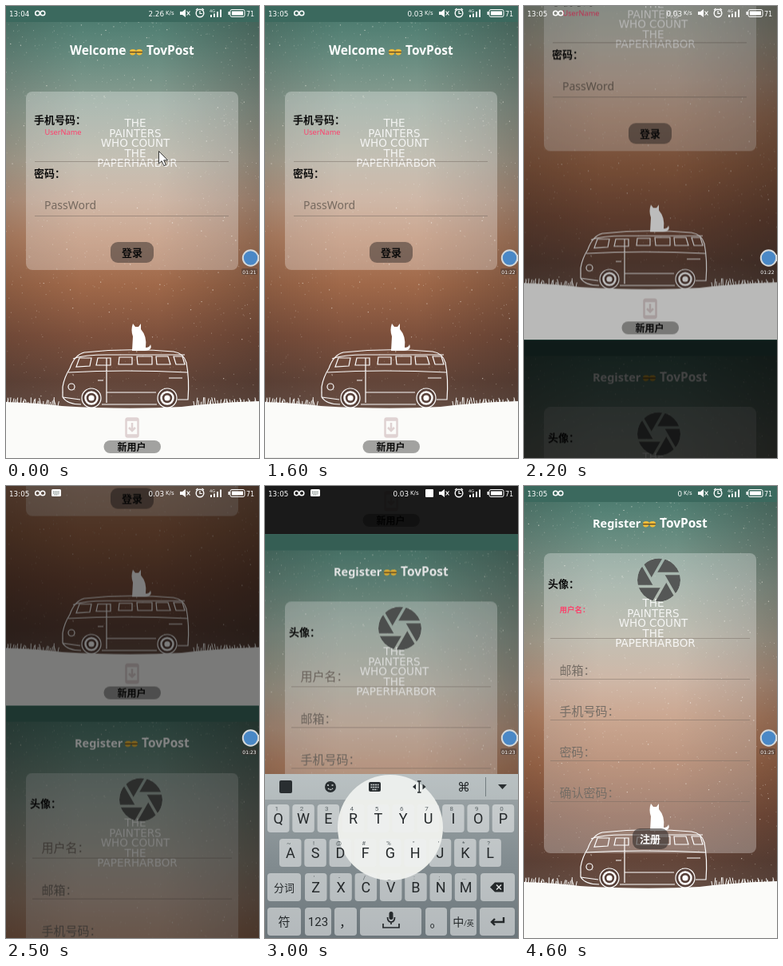
Recreate the animation shown at these times as an HTML page. Size 317 px wide and 565 px high, loop 4.7 s.

```html
<!DOCTYPE html>
<html lang="zh">
<head>
<meta charset="utf-8">
<title>Login and register</title>
<style>
  html, body { margin: 0; width: 100%; height: 100%; overflow: hidden; background: #000; }
  svg { display: block; width: 100%; height: 100%; overflow: hidden; }
  text { font-family: "Noto Sans", "Noto Sans CJK SC", "Noto Sans CJK", sans-serif; }
  .title { font-size: 15.500px; font-weight: 600; fill: #fff; }
  .label { font-size: 13px; font-weight: 700; fill: #0c0c0c; }
  .field { font-size: 15px; font-weight: 500; fill: #766e66; }
  .mid { text-anchor: middle; }
  .motto { font: 13.5px "DejaVu Sans", sans-serif; text-anchor: middle; fill: #fff; opacity: .85; }
  .bar { font: 8.8px "DejaVu Sans", sans-serif; fill: #fff; }
  .key { font: 18px Roboto, "Noto Sans CJK SC", "Noto Sans CJK", sans-serif; text-anchor: middle; fill: #25292b; }
  .hint { font: 8px Roboto, sans-serif; text-anchor: middle; fill: #596265; }
  .line { fill: none; stroke: #fff; stroke-width: 1.2; }
</style>
</head>
<body>
<svg viewBox="0 0 317 565" preserveAspectRatio="none">
  <defs>
    <linearGradient id="sky" x2="0" y2="1">
      <stop offset="0" stop-color="#44766a"/>
      <stop offset=".1" stop-color="#638a7e"/>
      <stop offset=".22" stop-color="#8c9e92"/>
      <stop offset=".34" stop-color="#aca695"/>
      <stop offset=".43" stop-color="#bb9a83"/>
      <stop offset=".51" stop-color="#b68465"/>
      <stop offset=".62" stop-color="#9f6849"/>
      <stop offset=".73" stop-color="#7d503c"/>
      <stop offset=".83" stop-color="#634539"/>
      <stop offset=".9" stop-color="#685147"/>
    </linearGradient>
    <linearGradient id="edges">
      <stop offset="0" stop-color="#2a201d" stop-opacity=".16"/>
      <stop offset=".3" stop-color="#2a201d" stop-opacity="0"/>
      <stop offset=".6" stop-color="#2a201d" stop-opacity="0"/>
      <stop offset="1" stop-color="#2a201d" stop-opacity=".28"/>
    </linearGradient>
    <linearGradient id="board" x2="0" y2="1">
      <stop offset="0" stop-color="#a0a8aa"/>
      <stop offset=".5" stop-color="#848e92"/>
      <stop offset="1" stop-color="#6c767b"/>
    </linearGradient>
    <mask id="blades">
      <circle r="27" fill="#fff"/>
      <path d="M-9.300 0L-4.650 -8.050H4.650L9.300 0 4.650 8.050H-4.650z"/>
      <g id="cuts" stroke="#000" stroke-width="3.400"></g>
    </mask>

    <g id="scene">
      <rect width="317" height="565" fill="url(#sky)"/>
      <rect width="317" height="565" fill="url(#edges)"/>
      <g id="stars" fill="none" stroke="#f4efe4" stroke-linecap="round"></g>
      <g id="motto"></g>
      <path fill="#fff" d="M159 397l3 4h4l3-4 0 7q8 9 6 23 5 0 6-4 3 7-7 8H158l1-18q-3-8 0-16z"/>
      <g class="line">
        <path d="M71 489l0-13q2-12 9-23 6-17 18-20 55-6 112-1 13 2 16 14 4 20 2 46h-13M71 489q6 9 23 9M120 498h69"/>
        <path d="M84 441q14-5 42-5h98M78 458q70-4 150 0M126 440v56M126 483h62"/>
        <path d="M92 440h15l-2 10-17 1zM115 440h16v9h-18zM142 439h16v9h-17zM164 438h19v10h-18zM188 438h15l3 10h-17zM210 438h11l3 10h-11z"/>
        <circle cx="82" cy="476" r="4"/>
        <path d="M115 468h7M204 465h17M71 489l22 3"/>
        <g id="wheels"></g>
      </g>
      <path fill="#fbfbf9" d="M0 495q40 1 70 5 80 5 150 1 50-6 97-7v81H0z"/>
      <path id="grass" fill="none" stroke="#fbfbf9"/>
    </g>

    <g id="snack">
      <path fill="#f1bd3a" d="M155 57q0-3 4-3t4 3zM163 57q0-3 4-3t4 3z"/>
      <path fill="#6b4a1c" d="M155 57h16v1.500h-16z"/>
      <path fill="#f0bb35" d="M155 58.500h7.500q-1 3-4 3t-3.500-3zM163.500 58.500h7.500q-1 3-4 3t-3.500-3z"/>
    </g>
  </defs>

  <g id="login">
    <use href="#scene"/>
    <rect width="317" height="20" fill="#3b695e"/>
    <text class="title" x="80" y="61">Welcome</text>
    <use href="#snack"/>
    <text class="title" x="176" y="61">TovPost</text>
    <rect x="25" y="107" width="266" height="223" rx="8" fill="#fff" opacity=".29"/>
    <text class="label" x="35" y="147">手机号码：</text>
    <text x="48.500" y="161" font-size="9.200" fill="#ff3f6c">UserName</text>
    <text class="label" x="35" y="214">密码：</text>
    <text x="48" y="254" font-size="14" font-weight="500" fill="#75695f">PassWord</text>
    <path d="M36 194.500H279M36 262.500H279" stroke="#756a61" opacity=".5"/>
    <rect x="131" y="295" width="54" height="26" rx="9" fill="#3c3331" opacity=".55"/>
    <text class="label mid" x="158" y="313">登录</text>
    <g fill="none" stroke="#dfd2d2" stroke-width="2.500">
      <rect x="150.500" y="515.500" width="15" height="23" rx="2"/>
      <path d="M150 517.500h16M150 536.500h16M158 521v9M154 527l4 4 4-4"/>
    </g>
    <rect x="122.500" y="543" width="71.500" height="16" rx="8" fill="#a2a2a0"/>
    <text class="label mid" x="157.500" y="555.500" style="font-size:12px">新用户</text>
    <rect id="loginShade" width="317" height="575" opacity="0"/>
  </g>

  <g id="register">
    <use id="registerScene" href="#scene"/>
    <rect width="317" height="20" fill="#3b695e"/>
    <text class="title" x="86" y="52" style="font-size:14.500px">Register</text>
    <use href="#snack" x="-6" y="-10"/>
    <text class="title" x="170" y="52">TovPost</text>
    <rect x="25" y="84" width="266" height="375" rx="8" fill="#fff" opacity=".29"/>
    <g transform="translate(169 117.500)"><circle r="27" fill="#555756" mask="url(#blades)"/></g>
    <text class="label" x="30" y="127">头像：</text>
    <text id="nameIdle" class="field" x="44.500" y="183">用户名：</text>
    <text id="nameActive" x="44.500" y="157.500" font-size="9.500" font-weight="700" fill="#f9456d">用户名：</text>
    <g id="fields"></g>
    <path id="focusLine" d="M33 190.500H283" stroke="#ff3f6c"/>
    <path id="caret" d="M43.500 165V186" stroke="#ff3f6c" stroke-width="1.500"/>
    <rect x="136" y="428" width="45" height="26" rx="9" fill="#332d2c" opacity=".6"/>
    <text class="label mid" x="158" y="446" style="fill:#fff">注册</text>
    <rect id="registerShade" width="317" height="565"/>
  </g>

  <g id="keyboard">
    <rect y="360" width="317" height="205" fill="url(#board)"/>
    <circle cx="157" cy="427" r="66" fill="#eceeea"/>
    <rect y="360" width="317" height="32" fill="#e9eded" opacity=".35"/>
    <g fill="#292e31">
      <rect x="18" y="368" width="16" height="16" rx="2"/>
      <circle cx="82" cy="376" r="7"/>
      <rect x="130" y="370" width="15" height="12" rx="2"/>
      <path d="M292 373h11l-5.500 6zM189 372.500v7l-4-3.500zM197.500 372.500v7l4-3.500z"/>
      <text class="key" x="249" y="382" style="font:16px 'DejaVu Sans',sans-serif">⌘</text>
    </g>
    <path d="M191 369h4.500M193.250 369v14M191 383h4.500" stroke="#292e31" stroke-width="1.400"/>
    <path d="M78 374h2.500M83.500 374h2.500M79 378q3 3 6 0M132.500 373.500h10M132.500 376.500h10M134.500 379.500h6" fill="none" stroke="#d5dada" stroke-width="1.300" stroke-dasharray="2 .8"/>
    <path d="M276.500 364v24" stroke="#737d80"/>
    <g id="keys"></g>
    <path d="M282 501.500l6-6h11v12h-11z" fill="#25292b"/>
    <path d="M290 498.500l6 6m0-6l-6 6" stroke="#dde1e1" stroke-width="1.500"/>
    <path d="M299 539v6h-15m4-4l-4 4 4 4" fill="none" stroke="#25292b" stroke-width="2.400"/>
    <path d="M148 547v5h20v-5M153.500 539q0 6 4.500 6t4.500-6M158 545v3" fill="none" stroke="#25292b" stroke-width="1.700"/>
    <rect x="155.500" y="532" width="5" height="10" rx="2.500" fill="#25292b"/>
  </g>

  <g id="status">
    <g id="clock"></g>
    <g fill="none" stroke="#fff" stroke-width="1.500">
      <circle cx="39.500" cy="9" r="2.800"/><circle cx="46" cy="9" r="2.800"/>
    </g>
    <g id="typing">
      <rect x="57" y="4" width="12" height="9" rx="1.500" fill="#fff"/>
      <path d="M59 7h8M59 9h8M60.500 11h5" stroke="#55645f" stroke-dasharray="1.300 .8"/>
    </g>
    <rect id="inputMark" x="201" y="4" width="10" height="10" rx="1" fill="#fff"/>
    <g id="speed"></g>
    <path d="M218 7h3l4-3v10l-4-3h-3zM256 11h2v3h-2zM260 9.500h2V14h-2zM264 7h2v7h-2zM268 4.500h2V14h-2z" fill="#fff"/>
    <path d="M226.500 6.500l4 5m0-5l-4 5M243 6v3.500h3M238 5l2.500-2M248 5l-2.500-2" stroke="#fff" fill="none" stroke-width="1.200"/>
    <circle cx="243" cy="9" r="4.800" fill="none" stroke="#fff" stroke-width="1.400"/>
    <text class="bar" x="255" y="7.500" style="font-size:5px">4G</text>
    <rect x="281" y="4.500" width="18" height="9" rx="2" fill="none" stroke="#fff"/>
    <path d="M283 6.500h14v5h-14zM278.500 7h2v4h-2z" fill="#fff"/>
    <text class="bar" x="301" y="12.500" style="font-size:8px">71</text>
  </g>

  <g id="recorder">
    <rect x="312" y="311" width="5" height="8" fill="#d9dcdd"/>
    <circle cx="306.500" cy="315" r="9.700" fill="#4a88c6" stroke="#d5d8d9" stroke-width="2"/>
    <rect x="295" y="328" width="20" height="8" rx="2" fill="#3b302c" opacity=".45"/>
    <g id="timer"></g>
  </g>

  <path id="pointer" d="M191.500 181.500v15.500l3.600-3.300 2.700 6 2.600-1.200-2.700-5.700h4.900z" fill="#fff" stroke="#222" stroke-width=".9"/>
</svg>

<script>
const LOOP = 4700;
const $ = id => document.getElementById(id);
const put = (id, markup) => $(id).insertAdjacentHTML('beforeend', markup);
const each = (n, draw) => Array.from({ length: n }, (_, i) => draw(i)).join('');

let seed = 17;
const random = () => (seed = seed * 16807 % 2147483647) / 2147483647;

// Wallpaper details
for (const [count, width, alpha] of [[700, .8, .28], [260, 1, .42], [60, 1.3, .65]]) {
  const dots = each(count, () => `M${(random() * 317).toFixed(1)} ${(20 + 470 * random() ** 1.2).toFixed(1)}h.1`);
  put('stars', `<path d="${dots}" stroke-width="${width}" opacity="${alpha}"/>`);
}
['THE', 'PAINTERS', 'WHO COUNT', 'THE', 'PAPERHARBOR'].forEach((line, i) =>
  put('motto', `<text class="motto" x="${i === 4 ? 164.500 : 162}" y="${151 + i * 12.500}">${line}</text>`));
for (const x of [107, 202]) {
  put('wheels', `<circle cx="${x}" cy="490" r="12" fill="#574039"/>
    <circle cx="${x}" cy="490" r="7.500" stroke-width="2.500"/><circle cx="${x}" cy="490" r="3" fill="#fff"/>`);
}
$('grass').setAttribute('d', each(56, i => {
  const x = i < 26 ? i * 2.600 : 236 + (i - 26) * 2.700;
  return `M${x.toFixed(1)} 500l${(random() * 6 - 3).toFixed(1)} ${(-5 - random() * 6).toFixed(1)}`;
}));

// Shutter icon
put('cuts', each(6, i => `<path d="M-9.300 0L6.500 -27.400" transform="rotate(${i * 60})"/>`));

// Register form
['', '邮箱：', '手机号码：', '密码：', '确认密码：'].forEach((label, i) => {
  const y = 190.500 + i * 51;
  put('fields', `<path d="M33 ${y}H283" stroke="#756a61" opacity=".45"/><text class="field" x="44.500" y="${y - 6}">${label}</text>`);
});

// Keyboard
function addKey(x, y, width, label = '', hint = '', size = 18) {
  const cx = x + width / 2;
  put('keys', `<rect x="${x}" y="${y}" width="${width}" height="35" rx="4" fill="#eef1f1" opacity=".55"/>
    <text class="key" x="${cx}" y="${y + 18 + size * .36}" style="font-size:${size}px">${label}</text>
    <text class="hint" x="${cx - 2}" y="${y + 8}">${hint}</text>`);
}
const addRow = (letters, hints, x, y) =>
  [...letters].forEach((letter, i) => addKey(x + i * 31.300, y, 27.500, letter, hints[i]));
addRow('QWERTYUIOP', '1234567890', 3, 398);
addRow('ASDFGHJKL', '~!@#%"\'*?', 18, 441);
addRow('ZXCVBNM', "'-/_:;…", 50, 484);
addKey(3, 484, 42, '分词', '', 13);
addKey(270, 484, 43);
addKey(3, 527, 42, '符', '', 15);
addKey(50, 527, 33, '123', '', 15);
addKey(87, 527, 28, '，', '', 16);
addKey(119, 527, 77);
addKey(201, 527, 27, '。', '', 16);
addKey(232, 527, 33, '中<tspan font-size="9">/英</tspan>', '', 14);
addKey(269, 527, 44);

// Stepped animation: [time, value] pairs, each held until the next
function play(id, property, steps) {
  const frames = steps.map(([ms, value]) => ({ offset: ms / LOOP, [property]: value, easing: 'step-end' }));
  frames.push({ offset: 1, [property]: steps.at(-1)[1] });
  $(id).animate(frames, { duration: LOOP, iterations: Infinity });
}
function show(id, from, to = LOOP) {
  const steps = [[from, 1]];
  if (from > 0) steps.unshift([0, 0]);
  if (to < LOOP) steps.push([to, 0]);
  play(id, 'opacity', steps);
}
function sequence(id, steps, markup) {
  steps.forEach(([from, value], i) => {
    const name = id + i;
    put(id, `<g id="${name}">${markup(value)}</g>`);
    show(name, from, steps[i + 1]?.[0]);
  });
}
const shift = y => `translateY(${y}px)`;

// Page change with a cosine ease
const travel = [[0, 0]];
for (let ms = 1600; ms <= 3400; ms += 100) {
  const phase = Math.min(1, (ms - 1588) / 1792);
  travel.push([ms, (1 - Math.cos(Math.PI * phase)) / 2]);
}
const along = fn => travel.map(([ms, p]) => [ms, fn(p)]);
play('login', 'transform', along(p => shift(-569 * p)));
play('register', 'transform', along(p => shift(565 * (1 - p))));
play('loginShade', 'opacity', along(p => p));
play('registerShade', 'opacity', along(p => 1 - p));

const fullSize = 'translateY(0px) scaleY(1)';
play('registerScene', 'transform', [[0, fullSize], [3400, 'translateY(7.52px) scaleY(.624)'], [4100, fullSize]]);
play('keyboard', 'transform', [[0, 205], [2600, 130], [2700, 60], [2800, 18], [2900, 0],
  [4100, 12], [4200, 50], [4300, 110], [4400, 170], [4500, 205]].map(([ms, y]) => [ms, shift(y)]));

show('pointer', 0, 100);
show('nameIdle', 0, 3400);
show('nameActive', 3400);
show('focusLine', 3400, 4400);
show('caret', 3500, 3800);
show('typing', 2300, 4300);
show('inputMark', 2800, 4300);

sequence('clock', [[0, '13:04'], [1500, '13:05']], time => `<text class="bar" x="4" y="12.500">${time}</text>`);
sequence('timer', [[0, 21], [1400, 22], [2400, 23], [3400, 24], [4400, 25]],
  s => `<text class="bar mid" x="305" y="334.500" style="font-size:6px">01:${s}</text>`);
sequence('speed', [[0, ['2.26', 0]], [1500, ['0.03', 0]], [2800, ['0.03', -18]], [4300, ['0', 0]]],
  ([rate, dx]) => `<text class="bar" x="${198 + dx}" y="12.500" text-anchor="end">${rate}</text>
    <text class="bar" x="${200 + dx}" y="11" style="font-size:7px">K/s</text>`);
</script>
</body>
</html>
```
